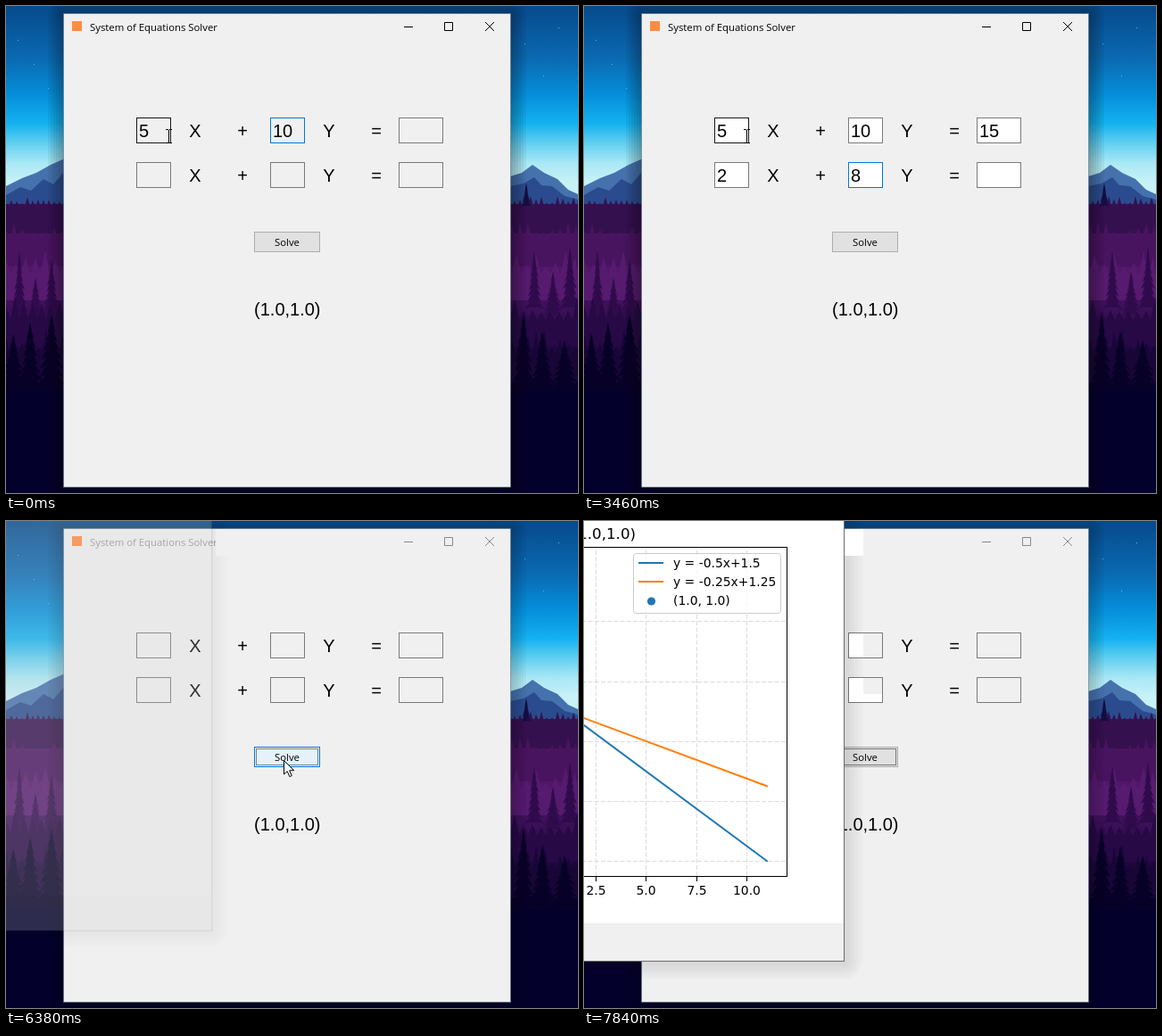
Recreate the animation shown at these times as an HTML page. Size 641 by 546 pixels, loop 7990 ms.

```html
<!DOCTYPE html>
<html lang="en">
<head>
<meta charset="utf-8">
<title>Equation solver</title>
<style>
  html, body { margin: 0; width: 100%; height: 100%; overflow: hidden; background: #04002c; }
  svg { display: block; width: 641px; height: 546px; }
  text { white-space: pre; }
  .big { font: 20px "Liberation Sans", Arial, sans-serif; }
  .ui { font: 11.34px "Open Sans", "Noto Sans", sans-serif; }
  .plot { font: 13.89px "DejaVu Sans", sans-serif; }
  .head { font: 16.67px "DejaVu Sans", sans-serif; }
  .mid { text-anchor: middle; }
  .end { text-anchor: end; }
</style>
</head>
<body>
<svg id="stage" viewBox="0 0 641 546" xmlns="http://www.w3.org/2000/svg">
  <defs>
    <linearGradient id="sky" x1="0" y1="0" x2="0" y2="220" gradientUnits="userSpaceOnUse">
      <stop offset="0" stop-color="#064a8c"/>
      <stop offset=".27" stop-color="#0a6ab2"/>
      <stop offset=".46" stop-color="#0590dc"/>
      <stop offset=".6" stop-color="#14b2f0"/>
      <stop offset=".7" stop-color="#62d0f1"/>
      <stop offset=".8" stop-color="#a9e8f5"/>
      <stop offset=".9" stop-color="#c9f2f7"/>
    </linearGradient>
    <linearGradient id="ground" x1="0" y1="215" x2="0" y2="440" gradientUnits="userSpaceOnUse">
      <stop offset="0" stop-color="#35104f"/>
      <stop offset=".3" stop-color="#57186d"/>
      <stop offset=".55" stop-color="#3c1059"/>
      <stop offset=".8" stop-color="#16063a"/>
      <stop offset="1" stop-color="#04002c"/>
    </linearGradient>
  </defs>
</svg>
<script>
const LOOP = 7990;
const stage = document.getElementById('stage');

function add(parent, tag, attrs, text) {
  const node = document.createElementNS(stage.namespaceURI, tag);
  set(node, attrs);
  if (text !== undefined) node.textContent = text;
  parent.append(node);
  return node;
}
function set(node, attrs) {
  for (const k in attrs) node.setAttribute(k, attrs[k]);
}
const group = parent => add(parent, 'g', {});
const rect = (parent, x, y, width, height, fill, more) =>
  add(parent, 'rect', { x, y, width, height, fill, ...more });
const path = (parent, d, fill, stroke = 'none', more) =>
  add(parent, 'path', { d, fill, stroke, ...more });
const label = (parent, x, y, cls, text) => add(parent, 'text', { x, y, class: cls }, text);
const show = (node, on) => set(node, { visibility: on ? 'visible' : 'hidden' });

// soft shadow built from stacked rounded boxes
function shadow(parent, x, y, w, h, reach, alpha) {
  const g = group(parent);
  for (let r = reach; r > 0; r -= 3)
    rect(g, x - r, y - r + 3, w + 2 * r, h + 2 * r - 3, '#000', { rx: r, opacity: alpha });
  return g;
}

// Landscape
let seed = 11;
const rnd = () => (seed = seed * 16807 % 2147483647) / 2147483647;

function forest(base, height, step, fill) {
  let d = `M0 ${base + 30}`;
  for (let x = 0; x <= 645; x += step) {
    const top = base - height * (0.3 + 0.7 * rnd());
    d += `L${x - step / 2} ${base}L${x} ${top}`;
  }
  path(stage, d + `L645 ${base + 30}Z`, fill);
}
function tree(x, top, h, w, fill) {
  const tiers = 9;
  let left = '', right = '';
  for (let i = 1; i <= tiers; i++) {
    const y = top + h * i / tiers, r = w * i / tiers * (0.8 + 0.3 * rnd());
    right += `L${x + r} ${y}L${x + r * 0.5} ${y - 2}`;
    left = `L${x - r * 0.5} ${y - 2}L${x - r} ${y}` + left;
  }
  path(stage, `M${x} ${top}${right}${left}Z`, fill);
}
rect(stage, 0, 0, 641, 546, 'url(#sky)');
for (const [x, y] of [[31, 65], [13, 38], [47, 92], [581, 42], [619, 24], [602, 78]])
  rect(stage, x, y, 1, 1, '#6cb4e0');
path(stage, 'M0 202L18 193L34 187L50 178L66 171V240H0ZM565 191L578 187L590 178L603 187L618 194L630 206L641 211V240H565Z', '#4572ad');
path(stage, 'M0 212L16 203L28 207L42 194L53 200L66 185V240H0ZM565 202L580 199L592 192L600 201L612 202L626 213L641 217V240H565Z', '#2a4c8e');
rect(stage, 0, 222, 641, 324, 'url(#ground)');
forest(225, 12, 6, '#35104f');
tree(583, 199, 27, 6, '#150d42');
forest(262, 20, 9, '#48135f');
forest(300, 25, 11, '#561a6e');
for (const [x, y, h] of [[15, 276, 75], [51, 284, 65], [33, 305, 50], [592, 275, 65], [632, 270, 70], [613, 298, 50]])
  tree(x, y, h, 11, '#300b4c');
forest(352, 28, 10, '#270945');
forest(392, 30, 9, '#180637');
for (const [x, y, h] of [[8, 368, 70], [27, 355, 85], [51, 346, 90], [580, 346, 96], [601, 365, 75], [626, 375, 60]])
  tree(x, y, h, 19, '#080127');
rect(stage, 0, 432, 641, 114, '#04002c');

// Solver window
const appShade = shadow(stage, 65, 9, 500, 530, 18, 0.055);
const app = group(stage);
rect(app, 64.5, 8.5, 501, 531, '#f0f0f0', { stroke: '#536478', 'stroke-opacity': 0.5 });
rect(app, 74, 17, 11, 11, '#ff8c42');
const title = label(app, 94, 28, 'ui', 'System of Equations Solver');
const controls = path(app, 'M446 23.5H456M491.5 18.5H500.5V27.5H491.5ZM537 18L547 28M547 18L537 28', 'none');

const cells = [], colX = [146, 296, 440], colW = [39, 39, 50];
for (let i = 0; i < 6; i++) {
  const c = i % 3, y = i < 3 ? 125 : 175;
  cells.push({
    box: rect(app, colX[c] + 0.5, y + 0.5, colW[c] - 1, 28, '#fff'),
    text: label(app, colX[c] + 3, y + 22, 'big', '')
  });
}
for (const y of [147, 197])
  for (const [x, s] of [[212, 'X'], [265, '+'], [362, 'Y'], [415, '=']])
    label(app, x, y, 'big mid', s);
label(app, 315.3, 347, 'big mid', '(1.0,1.0)');
const caret = rect(app, 0, 0, 1, 23, '#000');

const button = rect(app, 278.5, 253.5, 73, 22, '#e1e1e1');
const dots = rect(app, 280.5, 255.5, 69, 18, 'none', { stroke: '#111', 'stroke-dasharray': '1 1' });
label(app, 315, 269, 'ui mid', 'Solve');

// Plot window
const plotShade = shadow(stage, -388, -71, 642, 550, 21, 0.016);
const patch = group(stage);
const bar = rect(patch, 0, 9, 0, 30, '#fff');
const lowStrip = rect(patch, 297, 194, 37, 9, '#fff');
const sideStrip = path(patch, 'M297 126H313V153H297ZM297 176H313V203H297Z', '#fff');

const plot = group(stage);
rect(plot, -388.5, -71.5, 643, 551, '#fff', { stroke: '#6c6c6c' });
rect(plot, -388, 437, 642, 42, '#f0f0f0');
const chart = group(plot);
const px = v => -81 + 22.63 * v, py = v => 232.7 - 33.6 * v;
let grid = '', ticks = '';
for (const v of [0, 2.5, 5, 7.5, 10]) {
  const x = Math.round(px(v)) + 0.5;
  grid += `M${x} 384V15`;
  ticks += `M${x} 385V390`;
  label(chart, x, 405, 'plot mid', v.toFixed(1));
}
for (let v = -4; v <= 4; v += 2) grid += `M-306 ${Math.round(py(v)) + 0.5}H190`;
path(chart, grid, 'none', '#dcdcdc', { 'stroke-dasharray': '5 2.2' });
path(chart, ticks, 'none', '#000');
const lines = [['#1f77b4', -0.5, 1.5], ['#ff7f0e', -0.25, 1.25]];
for (const [color, a, b] of lines)
  path(chart, `M${px(-9)} ${py(-9 * a + b)}L${px(11)} ${py(11 * a + b)}`, 'none', color,
    { 'stroke-width': 2, 'stroke-linecap': 'square' });
rect(chart, -305.5, 15.5, 496, 369, 'none', { stroke: '#000' });
label(chart, 21, 6, 'head end', '(1.0,1.0)');
rect(chart, 18.5, 22.5, 165, 67, '#fff', { stroke: '#ccc', rx: 3, 'fill-opacity': 0.8 });
lines.forEach(([color, a, b], i) => {
  path(chart, `M24 ${33 + 21 * i}H52`, 'none', color, { 'stroke-width': 2 });
  label(chart, 63, 38 + 21 * i, 'plot', `y = ${a}x+${b}`);
});
add(chart, 'circle', { cx: 38.5, cy: 76, r: 4.6, fill: '#1f77b4' });
label(chart, 63, 80, 'plot', '(1.0, 1.0)');

// Pointers
const beam = path(stage, 'M179 138.5H182M183 138.5H186M182.5 139V153M179 153.5H182M183 153.5H186', 'none', '#000');
const arrow = path(stage, 'M.5 .5V16L4.2 12.6L6.8 18.6L9.2 17.6L6.7 11.7H11.7Z', '#fff', '#000');

// Each step lists only what changes; caret is an x offset in the focused cell
const start = {
  v: ['5', '10', '', '', '', ''], white: [], focus: 1, caret: null,
  beam: true, arrow: null, btn: 'idle', dots: false, active: true, plot: null
};
const all = [0, 1, 2, 3, 4, 5];
const row1 = ['5', '10', '15'];
const steps = [
  [0, {}],
  [270, { focus: 2, caret: 3, white: [1, 2] }],
  [800, { caret: null }],
  [1060, { v: ['5', '10', '1', '', '', ''] }],
  [1190, { caret: 14 }],
  [1330, { v: [...row1, '', '', ''], caret: 25 }],
  [1740, { caret: null }],
  [1890, { focus: 3, caret: 3, white: all }],
  [2410, { v: [...row1, '2', '', ''], caret: null }],
  [2830, { focus: 4, caret: 3 }],
  [3210, { v: [...row1, '2', '8', ''], caret: 14 }],
  [3460, { caret: null }],
  [3610, { focus: 5, caret: 3 }],
  [4020, { v: [...row1, '2', '8', '1'], caret: null }],
  [4150, { v: [...row1, '2', '8', '10'] }],
  [4440, { caret: 25 }],
  [5170, { beam: false, arrow: [262, 142], caret: null }],
  [5310, { arrow: [283, 197] }],
  [5430, { arrow: [302, 242], caret: 25 }],
  [5560, { arrow: [310, 262], btn: 'hover' }],
  [5720, { arrow: [311, 268] }],
  [5980, { btn: 'down', dots: true, focus: -1, caret: null }],
  [6110, { btn: 'hover' }],
  [6380, { v: ['', '', '', '', '', ''], white: [], active: false, plot: { zoom: 0.926, alpha: 0.18 } }],
  [6500, { plot: { zoom: 0.985, alpha: 0.75 } }],
  [6630, { plot: { zoom: 1, alpha: 1 } }],
  [6770, { btn: 'idle', arrow: [184, 194], low: true }],
  [6890, { arrow: null }],
  [7840, { plot: { zoom: 1, alpha: 1, dx: 37, dy: 14 }, side: true }]
];
let last = start;
const states = steps.map(([at, change]) => (last = { ...last, ...change, at }));

const looks = { idle: ['#e1e1e1', '#adadad'], hover: ['#e5f1fb', '#0078d7'], down: ['#cce4f7', '#005499'] };

function draw(s) {
  cells.forEach((cell, i) => {
    const hover = s.beam && i === 0;
    set(cell.box, {
      fill: s.white.includes(i) ? '#fff' : '#f0f0f0',
      stroke: i === s.focus ? '#0078d7' : hover ? '#171717' : '#7a7a7a'
    });
    cell.text.textContent = s.v[i];
  });
  show(caret, s.caret !== null);
  if (s.caret !== null)
    set(caret, { x: colX[s.focus % 3] + s.caret, y: s.focus < 3 ? 128 : 178 });
  const [fill, stroke] = looks[s.btn];
  set(button, { fill, stroke });
  show(dots, s.dots);
  set(title, { fill: s.active ? '#000' : '#999' });
  set(controls, { stroke: s.active ? '#000' : '#888' });
  set(appShade, { opacity: s.active ? 1 : 0.65 });
  show(beam, s.beam);
  show(arrow, s.arrow);
  if (s.arrow) set(arrow, { transform: `translate(${s.arrow})` });

  const p = s.plot;
  for (const node of [plotShade, plot, bar]) show(node, p);
  show(lowStrip, s.low);
  show(sideStrip, s.side);
  if (!p) return;
  const { zoom, alpha, dx = 0, dy = 0 } = p;
  const transform = `translate(${dx - 67} ${dy + 204}) scale(${zoom}) translate(67 -204)`;
  set(plot, { transform, opacity: alpha });
  set(plotShade, { transform, opacity: Math.max(alpha, 0.4) });
  set(chart, { opacity: alpha < 0.5 ? 0 : 1 });
  set(bar, { x: 254 * zoom + dx, width: 22, fill: alpha < 1 ? '#f0f0f0' : '#fff' });
}

const origin = performance.now();
let shown = null;
function tick() {
  const t = (performance.now() - origin) % LOOP;
  const s = states.findLast(state => state.at <= t) || states[0];
  if (s !== shown) draw(shown = s);
  requestAnimationFrame(tick);
}
tick();
</script>
</body>
</html>
```
